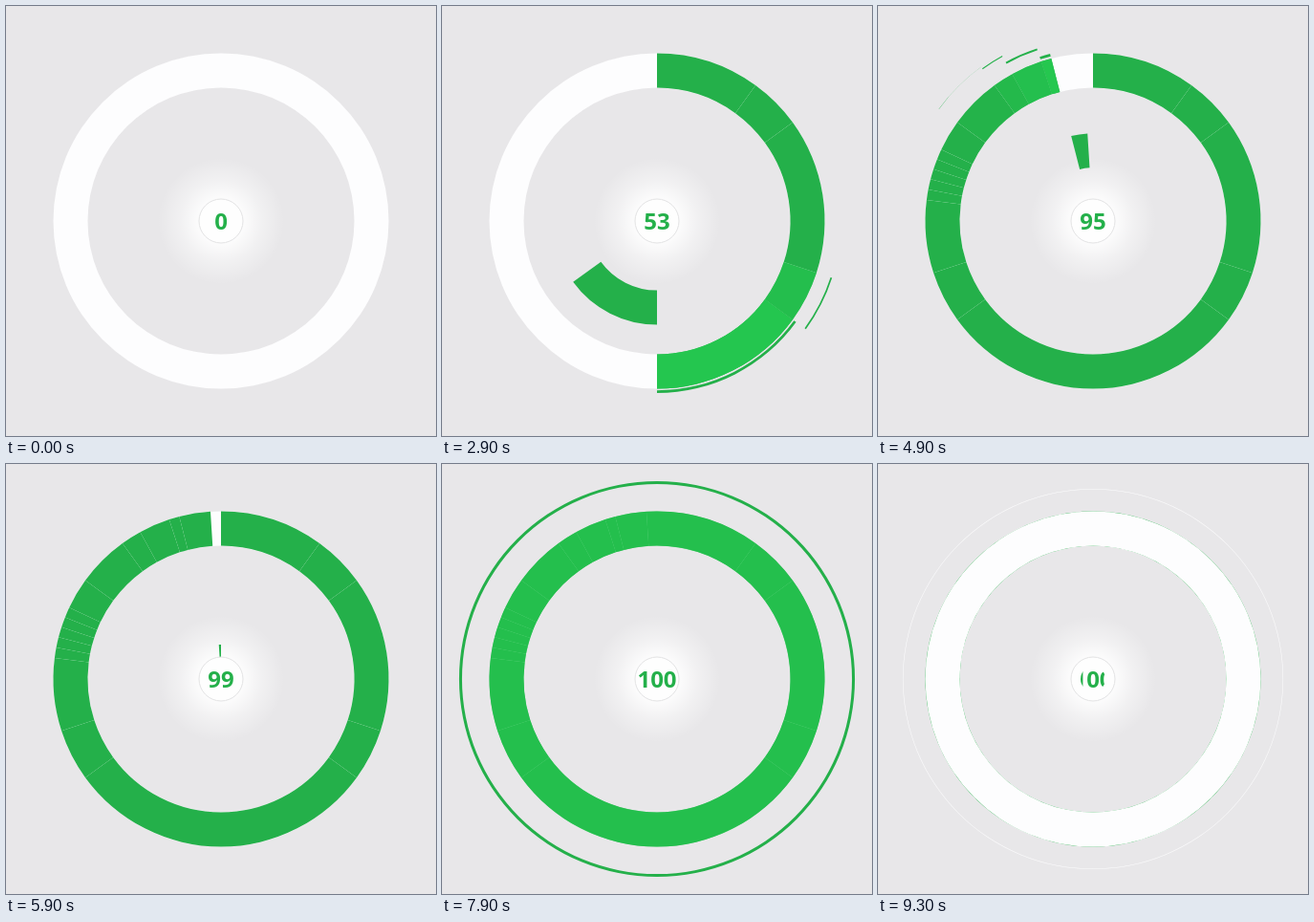
An HTML page with a canvas that plays this animation: 450x450 px, repeating every 9.4 s.

```html
<!DOCTYPE html>
<html lang="en">
<head>
<meta charset="utf-8">
<title>Progress ring</title>
<style>
html, body { margin: 0; width: 100%; height: 100%; overflow: hidden; background: #e8e7e9; }
canvas { display: block; width: 450px; height: 450px; }
</style>
</head>
<body>
<canvas id="stage" width="450" height="450"></canvas>
<script>
const ctx = document.getElementById("stage").getContext("2d");
const LOOP = 9400, STEP = 100;
const PAUSE_AT = 5900, PAUSE = 1200;
const CENTER = 225, INNER = 139.5, OUTER = 175.5, THICK = OUTER - INNER;
const SPEED = 0.31;
const GREEN = "#24b04a", FLASH = "#25c850", WHITE = "#fdfdfe";

// [end of segment in percent, landing time in ms]
const landings = [
  [10, 1180], [15, 1813], [30, 2058], [35, 2640], [50, 2860], [65, 3116],
  [70, 3580], [77, 3680], [78, 3760], [79, 3845], [80, 3913], [81, 4010],
  [82, 4116], [85, 4177], [90, 4350], [92, 4500], [95, 4700], [96, 4850],
  [99, 5170]
];
const segments = landings.map(([to, land], i) => ({
  from: i ? landings[i - 1][0] : 0, to, land, color: GREEN, reach: 24, life: 600, line: 3
}));
segments.push(
  { from: 99, to: 100, land: 6350, color: GREEN, reach: 50, life: 950, line: 4.75, whole: true },
  { from: 0, to: 100, land: 7600, color: WHITE, reach: 24, life: 600, line: 3 }
);

// [time in ms, value shown]
const counter = [
  [600, 0], [1000, 0], [1250, 10], [1700, 12], [2100, 30], [2650, 36], [2900, 53],
  [3120, 62], [3550, 68], [3900, 82], [4400, 90], [5200, 99], [6250, 99], [6350, 100]
];

function countAt(time) {
  if (time <= counter[0][0]) return 0;
  const i = counter.findIndex(([t]) => t > time);
  if (i < 0) return 100;
  const [t0, v0] = counter[i - 1], [t1, v1] = counter[i];
  return Math.floor(v0 + (v1 - v0) * (time - t0) / (t1 - t0));
}

const angle = percent => percent / 100 * Math.PI * 2 - Math.PI / 2;

function band(from, to, inner, outer, color) {
  ctx.beginPath();
  ctx.arc(0, 0, outer, angle(from), angle(to));
  ctx.arc(0, 0, Math.max(0, inner), angle(to), angle(from), true);
  ctx.fillStyle = color;
  ctx.fill();
}

function drawLanded(s, time) {
  const age = time - s.land, left = 1 - age / s.life;
  if (age < 0) return;
  const from = s.whole ? 0 : s.from;
  band(s.from, s.to, INNER, OUTER, s.color);
  if (left <= 0) return;
  if (s.color === GREEN) {
    ctx.globalAlpha = left;
    band(from, s.to, INNER, OUTER, FLASH);
    ctx.globalAlpha = 1;
  }
  const radius = OUTER + s.reach * (1 - left * left);
  const half = s.line * left / 2;
  band(from, s.to, radius - half, radius + half, s.color);
}

function drawFlying(s, time) {
  const radius = OUTER - (s.land - time) * SPEED;
  if (time < s.land && radius > 0) band(s.from, s.to, radius - THICK, radius, s.color);
}

function drawHub(t, time) {
  ctx.beginPath();
  ctx.arc(0, 0, 23, 0, Math.PI * 2);
  ctx.fillStyle = "#fefefe";
  ctx.fill();
  ctx.strokeStyle = "#e3e3e4";
  ctx.lineWidth = 1;
  ctx.stroke();

  ctx.save();
  ctx.beginPath();
  ctx.arc(0, 0, t > 9000 ? 23 - (t - 9000) / 30 : 23, 0, Math.PI * 2);
  ctx.clip();
  ctx.font = 'bold 24px "Noto Sans", "Open Sans", sans-serif';
  ctx.fontStretch = "ultra-condensed";
  ctx.textAlign = "center";
  ctx.fillStyle = GREEN;
  ctx.fillText(countAt(time), 0, 9);
  ctx.restore();
}

function draw(t) {
  const time = t < PAUSE_AT ? t : Math.max(PAUSE_AT, t - PAUSE);
  ctx.setTransform(1, 0, 0, 1, CENTER, CENTER);
  ctx.fillStyle = "#e8e7e9";
  ctx.fillRect(-CENTER, -CENTER, 450, 450);

  const halo = ctx.createRadialGradient(0, 0, 20, 0, 0, 66);
  halo.addColorStop(0, "rgba(255,255,255,0.95)");
  halo.addColorStop(0.5, "rgba(255,255,255,0.4)");
  halo.addColorStop(1, "rgba(255,255,255,0)");
  ctx.fillStyle = halo;
  ctx.fillRect(-70, -70, 140, 140);

  band(0, 100, INNER, OUTER, WHITE);
  segments.forEach(s => drawLanded(s, time));
  segments.forEach(s => drawFlying(s, time));
  drawHub(t, time);
}

const start = performance.now();
function tick() {
  const t = (performance.now() - start) % LOOP;
  draw(Math.floor(t / STEP) * STEP);
  requestAnimationFrame(tick);
}
tick();
</script>
</body>
</html>
```
